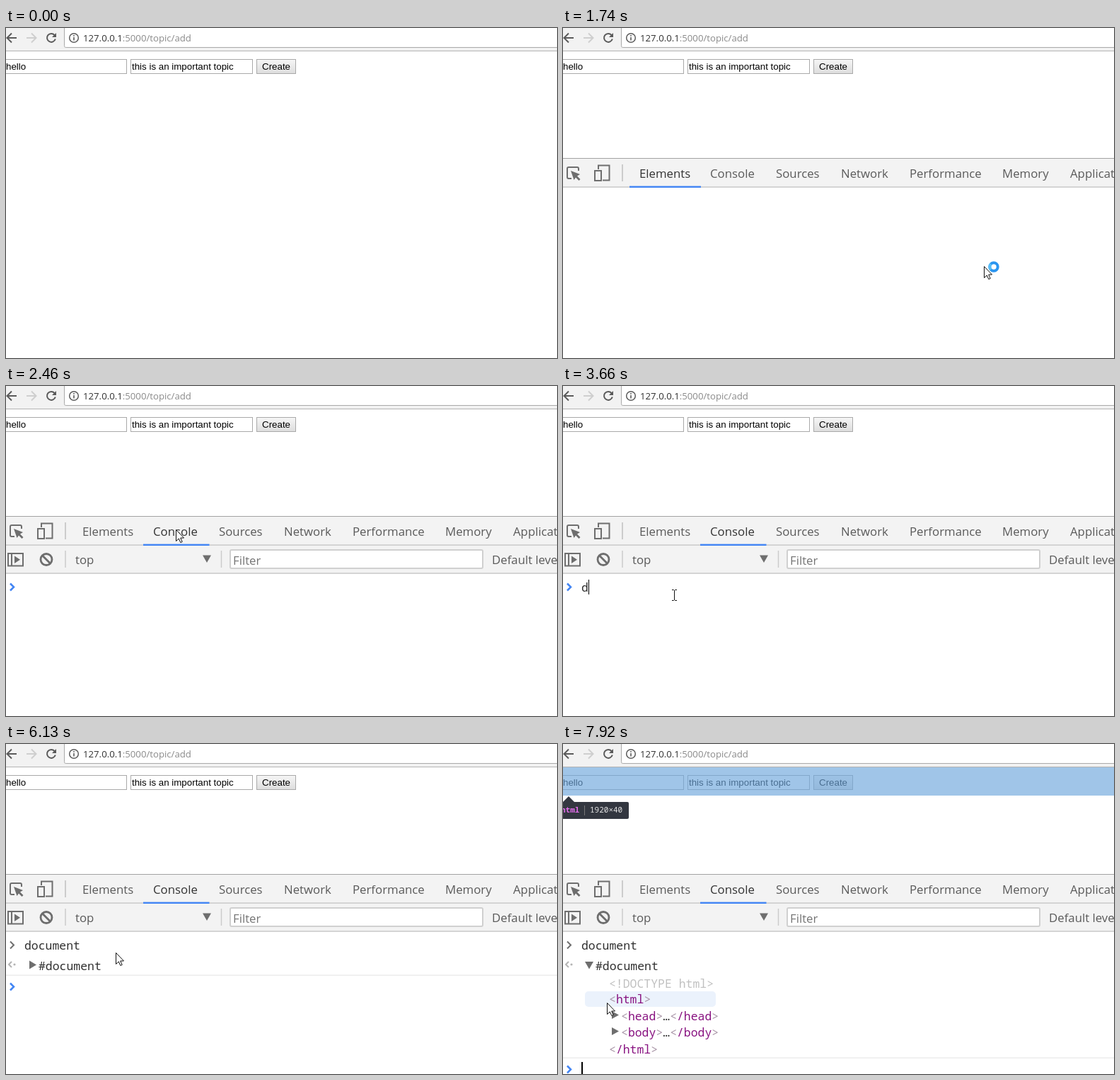
Recreate the animation shown at these times as an HTML page. Size 779 by 467 pixels, loop 8 s.

```html
<!DOCTYPE html>
<html lang="en">
<head>
<meta charset="utf-8">
<title>Console demo</title>
<style>
html, body { margin: 0; width: 100%; height: 100%; overflow: hidden; background: #fff; }
svg { display: block; }
text { white-space: pre; }
.ui { font: 16.8px "Open Sans", "Noto Sans", sans-serif; fill: #5a5a5a; }
.url { font: 13.2px "Open Sans", "Noto Sans", sans-serif; }
.form { font: 13.333px "Liberation Sans", Arial, sans-serif; }
.mono { font: 16.47px "Noto Sans Mono", "DejaVu Sans Mono", monospace; fill: #303030; }
.tip { font: 11px "Noto Sans Mono", monospace; }
.icon { fill: none; stroke: #6e6e6e; stroke-width: 2; }
.solid { fill: #6e6e6e; stroke: none; }
.p { fill: #a894a6; } .n { fill: #881280; } .a { fill: #994500; } .v { fill: #1a1aa6; }
.doctype { fill: #c0c0c0; } .comment { fill: #236e25; }
</style>
</head>
<body>
<svg width="779" height="467" viewBox="0 0 779 467">
  <defs>
    <linearGradient id="btn" x2="0" y2="1"><stop stop-color="#f6f6f6"/><stop offset="1" stop-color="#dddddd"/></linearGradient>
  </defs>
  <rect width="779" height="467" fill="#fff"/>

  <!-- browser bar -->
  <rect width="779" height="32" fill="#f2f2f2"/>
  <rect y="32" width="779" height="1" fill="#b4b4b4"/>
  <rect x="82.5" y="-3.5" width="720" height="31" rx="2" fill="#fff" stroke="#a9a9a9"/>
  <g fill="none" stroke="#5a5a5a" stroke-width="2">
    <path d="M15 14H2M8 7.5L1.5 14L8 20.5"/>
    <path d="M29 14H42M36 7.5L42.5 14L36 20.5" stroke="#cfcfcf"/>
    <path d="M68.6 10A6 6 0 1 0 69.8 15.5"/>
    <path d="M71 7V13H65Z" fill="#5a5a5a" stroke="none"/>
    <circle cx="96" cy="14" r="6.3" stroke-width="1.5"/>
    <path d="M96 13V17.5M96 10V11.7" stroke-width="1.6"/>
  </g>
  <text class="url" x="109" y="19" fill="#333">127.0.0.1<tspan fill="#8a8a8a">:5000/topic/add</tspan></text>

  <!-- page -->
  <g class="form">
    <g fill="#fff" stroke="#a9a9a9">
      <rect x="-2.5" y="44.5" width="173" height="20"/>
      <rect x="176.5" y="44.5" width="172" height="20"/>
      <rect x="354.5" y="44.5" width="55" height="20" fill="url(#btn)"/>
    </g>
    <text x="0" y="59">hello</text>
    <text x="178" y="59">this is an important topic</text>
    <text x="362" y="59">Create</text>
  </g>
  <rect id="overlay" y="33" width="779" fill="#6fa8dc" fill-opacity=".66"/>
  <g id="tooltip">
    <path d="M0 82L8 74L16 82H91Q93 82 93 84V104Q93 106 91 106H0Z" fill="#333740"/>
    <rect x="30" y="87" width="1" height="14" fill="#777"/>
    <text class="tip" x="-3" y="97" fill="#e36eec" font-weight="bold" style="font-weight:700">html</text>
    <text class="tip" x="38" y="97" fill="#e4e4e4">1920×40</text>
  </g>

  <!-- developer tools -->
  <g id="tools">
    <rect y="184" width="779" height="283" fill="#fff"/>
    <rect y="185" width="779" height="40" fill="#f3f3f3"/>
    <rect y="184" width="779" height="1" fill="#a3a3a3"/>
    <rect y="224.3" width="779" height="1.6" fill="#cccccc"/>
    <rect x="83" y="193" width="2" height="24" fill="#cccccc"/>
    <g id="tabs" class="ui"></g>
    <rect id="underline" y="223.6" height="2.4" fill="#4285f4"/>
    <g id="icons" class="icon">
      <path d="M12 213H8Q6 213 6 211V199Q6 197 8 197H20Q22 197 22 199V202"/>
      <path class="solid" d="M11 202L24 207L20 209.5L24.5 214L22.5 216L18 211.5L15.500 215Z"/>
      <path d="M50 200V194.500H65.500V215.500H56"/>
      <rect x="45" y="202" width="9" height="14"/>
    </g>

    <g id="tree" class="mono">
      <rect id="treeHover" y="254" width="779" height="22" fill="#ebf2fc"/>
      <rect y="301" width="779" height="22" fill="#3879d9"/>
      <rect x="19" y="324" width="2" height="143" fill="#a9c5f3"/>
      <path class="solid" d="M15 281L25 287L15 293ZM33 328L43 334L33 340Z"/>
      <path fill="#fff" d="M13 306H25L19 316ZM0 312H3V315H0ZM6 312H9V315H6Z"/>
    </g>

    <g id="console">
      <rect y="226" width="779" height="39" fill="#f3f3f3"/>
      <rect y="264.300" width="779" height="1.600" fill="#cccccc"/>
      <path d="M84 233V257M304.500 233V257" stroke="#ccc" stroke-width="1.500"/>
      <g class="icon">
        <rect x="3" y="237" width="21" height="17.500"/>
        <path d="M8 237V254"/>
        <path class="solid" d="M12 240.500L20 245.700L12 251Z"/>
        <circle cx="57" cy="245.500" r="8" stroke-width="2.800"/>
        <path d="M51.500 240L62.500 251" stroke-width="2.800"/>
        <path class="solid" d="M278 239.500H290L284 250Z"/>
      </g>
      <rect x="317" y="232" width="357" height="26" rx="2" fill="#fff" stroke="#d0d0d0" stroke-width="2"/>
      <g class="ui">
        <text x="98" y="252">top</text>
        <text x="321" y="253" fill="#757575">Filter</text>
        <text x="687" y="252">Default levels</text>
      </g>
      <g id="output" class="mono">
        <rect id="rowHover" x="31" rx="5" fill="#ebf2fc"/>
        <path class="icon" d="M6 279.500L11 284.500L6 289.500"/>
        <path d="M8 308L4 312L8 316" fill="none" stroke="#b4b4b4" stroke-width="2"/>
        <circle cx="12" cy="312" r="1.600" fill="#b4b4b4"/>
        <text x="26" y="291">document</text>
        <text x="46" y="320">#document</text>
        <path id="arrow" class="solid"/>
        <g id="nodes"><path class="solid" d="M69 378L79 383.500L69 389ZM69 401L79 406.500L69 412Z"/></g>
      </g>
      <g id="prompt" class="mono">
        <rect id="divider" y="-17" width="779" height="1.500" fill="#ececec"/>
        <path d="M6 -5L11 0L6 5" fill="none" stroke="#4285f4" stroke-width="2.500"/>
        <text x="26" y="6.500"><tspan id="typed"></tspan><tspan id="ghost" fill="#a8a8a8"></tspan></text>
        <rect id="caret" y="-10.500" height="21" fill="#000"/>
      </g>
      <g id="popup" class="mono"></g>
    </g>
  </g>

  <g id="pointer">
    <path d="M.5.5V16.500L4.300 13L6.800 18.500L9.200 17.500L6.700 12H11.500Z" fill="#fff" stroke="#111"/>
    <g id="busy" fill="none" stroke-width="4">
      <circle cx="14" cy="1" r="5.700" stroke="#2a95f0"/>
      <path d="M10 5A5.700 5.700 0 0 1 10 -3" stroke="#57bdf6"/>
    </g>
  </g>
  <path id="beam" d="M154 288.500H156.500L157.500 289.500L158.500 288.500H161M154 303.500H156.500L157.500 302.500L158.500 303.500H161M157.500 289V303" fill="none" stroke="#111"/>
</svg>
<script>
const LOOP = 8000, CHAR = 9.88;
const $ = id => document.getElementById(id);
const show = (id, on) => $(id).setAttribute('visibility', on ? 'inherit' : 'hidden');
const set = (id, attrs) => { for (const k in attrs) $(id).setAttribute(k, attrs[k]); };
const add = (id, markup) => $(id).insertAdjacentHTML('beforeend', markup);
const span = (cls, s) => `<tspan class="${cls}">${s}</tspan>`;
const tag = (name, rest = '') => span('p', '&lt;') + span('n', name) + rest + span('p', '&gt;');
const line = (x, y, body, cls = '') => `<text x="${x}" y="${y}" class="${cls}">${body}</text>`;

const tabs = [['Elements', 108], ['Console', 208], ['Sources', 301], ['Network', 393],
  ['Performance', 490], ['Memory', 621], ['Application', 717]];
add('tabs', tabs.map(([name, x]) => line(x, 212, name)).join(''));

const folded = name => tag(name) + '…' + tag('/' + name);
const attr = span('a', ' class') + span('p', '="') + span('v', 'input-form') + span('p', '"');
const script = ['&lt;!--&lt;script&gt;',
  "    document.addEventListener('DOMContentLoaded', function(){",
  '        var submitButton = document.getElementById("submit_button");', '',
  '        submitButton.onclick = (function() {', '            alert("hello");'];
add('tree',
  line(11, 247, '&lt;!DOCTYPE html&gt;', 'doctype') + line(10, 271, tag('html')) +
  line(28, 294, folded('head')) +
  line(28, 318, '<tspan fill="#a9c6ef">&lt;</tspan><tspan fill="#fff">body</tspan><tspan fill="#a9c6ef">&gt; == <tspan font-style="italic">$0</tspan></tspan>') +
  line(46, 341, tag('div', attr) + '…' + tag('/div')) +
  script.map((s, i) => line(47, 364.500 + i * 22.300, s, 'comment')).join(''));
add('nodes',
  line(65, 344.500, '&lt;!DOCTYPE html&gt;', 'doctype') + line(65, 367, tag('html')) +
  line(82, 391, folded('head')) + line(82, 414, folded('body')) + line(65, 438, tag('/html')));

const popups = [
  [347, ['document', 'decodeURI', 'decodeURIComponent', 'defaultStatus', 'defaultstatus', 'devicePixelRatio', 'dispatchEvent']],
  [199, ['document', 'DOMError', 'DOMException', 'DOMImplementation', 'DOMParser', 'DOMStringList', 'DOMStringMap']],
  [199, ['document', 'Document', 'DocumentFragment', 'DocumentType', 'DocumentTimeline', 'DocumentTouch']]];
popups.forEach(([width, items], i) => add('popup',
  `<g id="list${i}"><rect x="21" y="298" width="${width}" height="180" fill="#fff" stroke="#c4c4c4"/>
   <rect x="21" y="299" width="${width}" height="23" fill="#3879d9"/>` +
  items.map((s, k) => `<text x="26" y="${316 + k * 24}" ${k ? '' : 'style="fill:#fff"'}>${s}</text>`).join('') + '</g>'));

// Each step: start time, then the values held until the next step.
const moves = [[60, 667, 413], [140, 640, 384], [220, 616, 352], [300, 603, 337], [520, 599, 337],
  [590, 595, 337], [1800, 568, 326], [1880, 495, 292], [1960, 413, 261], [2020, 360, 243],
  [2090, 305, 226], [2160, 266, 212], [2240, 245, 204], [2330, 240, 203], [2560, 226, 215],
  [2640, 205, 240], [2720, 186, 264], [2800, 171, 281], [2880, 161, 290], [2960, 157, 294],
  [3050, 155, 295], [6970, 126, 301], [7040, 75, 309], [7130, 56, 310], [7220, 44, 310],
  [7300, 38, 310], [7380, 35, 310], [7710, 40, 319], [7780, 52, 424], [7850, 60, 392], [7920, 62, 366]];
const hovers = [[0, ''], [1960, 'tree'], [2020, ''], [7040, 'doc'], [7780, ''], [7920, 'html']];
const typing = [[0, 0], [3660, 1], [3800, 2], [3880, 3], [5130, 8], [5650, 0]];
const lists = [[0, -1], [3730, 0], [3800, 1], [3880, 2], [5130, -1]];
const carets = [[0, 0], [2470, 1], [3050, 0], [3660, 1], [4420, 0], [4960, 1], [6130, 0], [6650, 1]];
const prompts = [[0, 284.500], [5650, 343.500], [7470, 460.500]];
const at = (steps, t) => steps.findLast(s => s[0] <= t) || steps[0];

function render(t) {
  const within = (a, b) => t >= a && t < b;
  const inConsole = t >= 2400, done = t >= 5650, open = t >= 7470;
  const [, x, y] = at(moves, t);
  const hover = at(hovers, t)[1], typed = at(typing, t)[1], list = at(lists, t)[1];
  const promptY = at(prompts, t)[1];

  show('tools', t >= 1500);
  show('icons', t >= 1650);
  show('tree', within(1800, 2400));
  show('treeHover', hover === 'tree');
  show('console', inConsole);
  set('underline', inConsole ? { x: 194, width: 93.500 } : { x: 94, width: 101 });
  [...$('tabs').children].forEach((tab, i) => { tab.style.fill = i === +inConsole ? '#333' : '#5a5a5a'; });

  show('overlay', hover);
  set('overlay', { height: hover === 'doc' ? 151 : 40 });
  show('tooltip', hover === 'tree' || hover === 'html');

  show('output', inConsole && done);
  show('nodes', inConsole && open);
  set('arrow', { d: open ? 'M31 308H43L37 318.500Z' : 'M33 306.500L43 312.500L33 318.500Z' });
  show('rowHover', inConsole && (hover === 'doc' || hover === 'html'));
  set('rowHover', { y: hover === 'html' ? 350 : 303, width: open ? 185 : 99, height: 22 });

  set('prompt', { transform: `translate(0 ${promptY})` });
  show('divider', inConsole && done);
  $('typed').textContent = 'document'.slice(0, typed);
  $('ghost').textContent = list < 0 ? '' : 'document'.slice(typed);
  show('caret', inConsole && at(carets, t)[1]);
  set('caret', { x: Math.round(26 + typed * CHAR), width: typed ? 1 : 2 });
  popups.forEach((_, i) => show('list' + i, inConsole && i === list));

  const beam = within(3270, 5650);
  show('beam', beam);
  show('pointer', t >= 60 && !beam);
  show('busy', within(1040, 2400));
  set('pointer', { transform: `translate(${x} ${y})` });
}

// Hidden groups must hide their children, so only "inherit" is used for shown parts.
const start = performance.now();
function frame(now) {
  render(Math.max(0, now - start) % LOOP);
  requestAnimationFrame(frame);
}
render(0);
requestAnimationFrame(frame);
</script>
</body>
</html>
```
